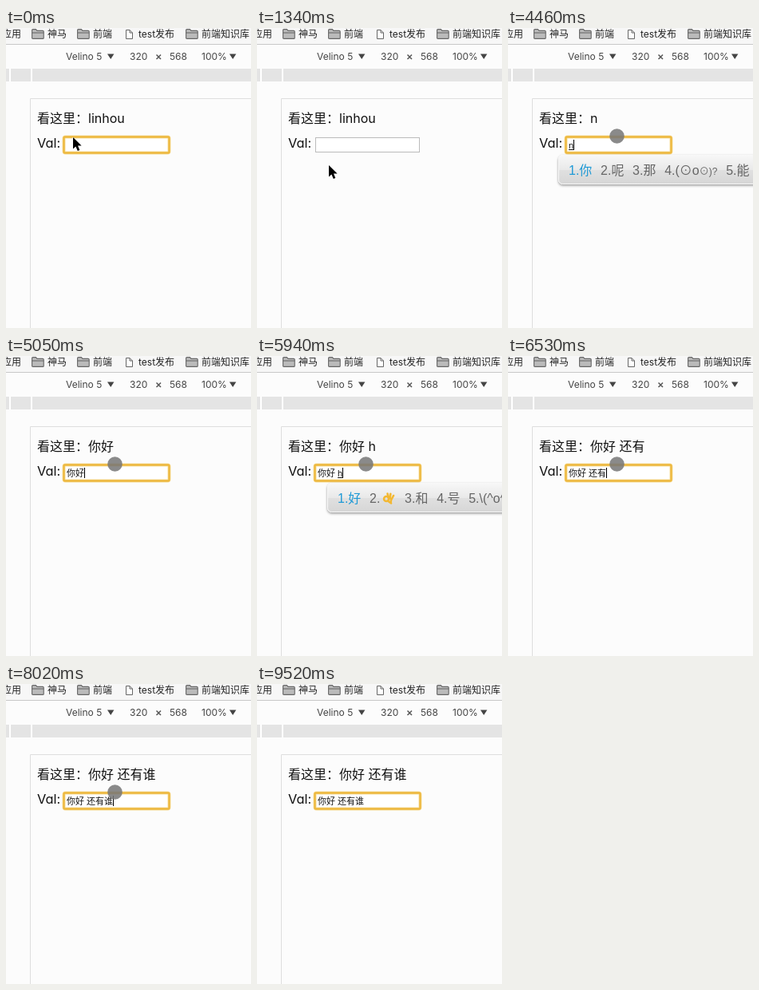
An HTML page that plays this animation: 307x376 px, repeating every 9680 ms.

```html
<!DOCTYPE html>
<html lang="zh">
<head>
<meta charset="utf-8">
<title>Input binding</title>
<style>
  html, body { margin: 0; width: 100%; height: 100%; overflow: hidden; background: #fcfcfc; }
  svg { display: block; }
  text { white-space: pre; }
  .bar { font: 12px Inter, "Noto Sans CJK SC", "Noto Sans CJK", sans-serif; fill: #222; }
  .tool { fill: #444; }
  .page { font: 16.4px Inter, sans-serif; font-feature-settings: "cv11"; fill: #111; }
  .han { font: 16px "Noto Sans CJK SC", "Noto Sans CJK", sans-serif; fill: #111; }
  .value { font: 11px "Liberation Sans", "Noto Sans CJK SC", "Noto Sans CJK", sans-serif; fill: #111; }
  .pick { font: 16px "Liberation Sans", "Noto Sans CJK SC", "Noto Sans CJK", "DejaVu Sans", sans-serif; fill: #666; }
  .pick.first { fill: #1f9ad6; }
</style>
</head>
<body>
<svg width="307" height="376" viewBox="0 0 307 376">
  <defs>
    <linearGradient id="panelFill" x2="0" y2="1">
      <stop stop-color="#f7f7f7"/><stop offset=".5" stop-color="#e9e9e9"/>
      <stop offset=".52" stop-color="#e0e0e0"/><stop offset="1" stop-color="#d6d6d6"/>
    </linearGradient>
    <filter id="shadow" x="-10%" y="-30%" width="120%" height="170%">
      <feDropShadow dx="0" dy="1.5" stdDeviation="1.7" flood-opacity=".4"/>
    </filter>
    <g id="folder" stroke="#666" stroke-width="1.1">
      <path d="M.6 11.4V1.8Q.6.6 1.8.6H5.4L7 2.4H14Q15.2 2.4 15.2 3.6V11.4Q15.2 12.4 14 12.4H1.8Q.6 12.4.6 11.4Z" fill="#bbb"/>
      <path d="M.6 5H15.2" />
    </g>
    <path id="down" d="M0 0H8.4L4.2 6.6Z" fill="#444"/>
    <g id="hand" fill="none" stroke="#f3b832" stroke-width="2.6" stroke-linecap="round">
      <circle cx="5" cy="8" r="3"/>
      <path d="M7.5 6L6.5 1.5M9.5 7.5L10.3 1.7M11 9.5L14 4M8 11.5L11 13.5M11 9L10.5 13"/>
    </g>
  </defs>

  <rect width="307" height="376" fill="#fcfcfc"/>
  <rect width="307" height="20" fill="#f7f7f7"/>
  <path d="M0 20.5H307" stroke="#c8c8c8"/>
  <g class="bar">
    <text x="-5" y="12">应用</text>
    <use href="#folder" x="32" y="1"/><text x="52" y="12">神马</text>
    <use href="#folder" x="89" y="1"/><text x="109" y="12">前端</text>
    <path d="M150.5 2.5H155L158.5 6V13.5H150.5ZM155 2.5V6H158.5" fill="#fff" stroke="#666"/>
    <text x="166" y="12">test发布</text>
    <use href="#folder" x="225" y="1"/><text x="245" y="12">前端知识库</text>
  </g>
  <g class="bar tool">
    <text class="tool" x="75" y="40">Velino 5</text><use href="#down" x="127" y="32.5"/>
    <text class="tool" x="155" y="40">320</text>
    <path d="M188.5 33.5L194 39M194 33.5L188.5 39" stroke="#555" stroke-width="1.5"/>
    <text class="tool" x="205" y="40">568</text>
    <text class="tool" x="245" y="40">100%</text><use href="#down" x="280" y="32.5"/>
  </g>
  <rect y="51" width="307" height="16" fill="#e4e4e4"/>
  <path d="M5 51V67M32 51V67" stroke="#fff" stroke-width="2"/>
  <path d="M30.5 376V88.5H307" fill="none" stroke="#dedede"/>

  <text class="han" x="39" y="119">看这里：</text>
  <text class="page han" id="echo" x="103" y="118.5" style="font-family:Inter,'Noto Sans CJK SC','Noto Sans CJK',sans-serif"></text>
  <text class="page" x="39" y="150">Val:</text>
  <rect x="73.5" y="137.5" width="130" height="18" fill="#fff" stroke="#bbb"/>
  <g id="ring" fill="none">
    <rect x="72.5" y="136.5" width="132" height="20" rx="2" stroke="#f8dfa0" stroke-width="4"/>
    <rect x="72.5" y="136.5" width="132" height="20" rx="1.5" stroke="#edb83f" stroke-width="2.4"/>
  </g>
  <text class="value" id="value" x="76" y="151"></text>
  <rect id="underline" y="152" height="1" fill="#111"/>
  <rect id="caret" y="140" width="1" height="13" fill="#000"/>
  <g id="panel">
    <rect x="-12.5" y="159.5" width="400" height="36" rx="5" fill="url(#panelFill)" stroke="#f8f8f8" filter="url(#shadow)"/>
    <g id="picks"></g>
  </g>
  <circle id="dot" cx="136.5" cy="135.5" r="9.3" fill="#777" fill-opacity=".86"/>
  <path id="arrow" d="M0 0V14.5L3.4 11.5L5.8 17L8.3 16L6 10.6H10.6Z" fill="#000" stroke="#fff" stroke-width="1" paint-order="stroke"/>
</svg>
<script>
const LOOP = 9680;
const el = id => document.getElementById(id);
const show = (id, on) => el(id).style.display = on ? '' : 'none';

// [time, committed text, text being composed]
const typing = [
  [0, '', ''], [3270, 'n', ''], [3570, '', ''],
  [4460, '', 'n'], [4610, '', 'ni'], [4750, '', 'ni h'], [4900, '', 'ni hao'], [5050, '你好', ''],
  [5790, '你好 ', ''], [5940, '你好 ', 'h'], [6090, '你好 ', 'ha'], [6240, '你好 ', 'hai'],
  [6390, '你好 ', 'hai you'], [6530, '你好 还有', ''],
  [6680, '你好 还有', 's'], [6830, '你好 还有', 'shei'], [6980, '你好 还有谁', '']
];
const candidates = {
  n: '你 呢 那 (⊙o⊙)? 能', ni: '你 呢 泥 尼 妮', 'ni h': '你好 你会 你还 你和', 'ni hao': '你好 拟好 你 呢',
  h: '好 👌 和 号 \\(^o^)/', ha: '哈 蛤 好 还 海', hai: '还 海 嗨 害 孩', 'hai you': '还有 海油 还 海',
  s: '是 谁 上 说 三', shei: '谁 水 说 睡 税'
};
// [time, x, y]; the pointer is hidden where x is missing
const pointer = [
  [0, 84, 137], [450, 85, 146], [600, 89, 165], [750, 93, 190], [890, 94, 203], [1040, 94, 203],
  [1190, 93, 192], [1340, 90, 172], [1490, 89, 157], [1630, 89, 149],
  [1930, 95, 146], [2080, 110, 141], [2230, 127, 135], [2380, 135, 133],
  [3570], [8770, 137, 160], [8920, 163, 232], [9070, 212, 360], [9220]
];
const focus = [[0, true], [1040, false], [2080, true]];
const caret = [
  [0, false], [2820, true], [4010, false], [4460, true], [5490, false], [5790, true],
  [7420, false], [8020, true], [8470, false], [9070, true], [9520, false]
];
const at = (track, t) => track.findLast(key => key[0] <= t);

function addPick(x, text, first) {
  const node = document.createElementNS('http://www.w3.org/2000/svg', 'text');
  node.setAttribute('class', first ? 'pick first' : 'pick');
  node.setAttribute('x', x);
  node.setAttribute('y', 184);
  node.textContent = text;
  el('picks').append(node);
  return node;
}

function fillPanel(composing) {
  el('picks').replaceChildren();
  let x = 0;
  candidates[composing].split(' ').forEach((word, i) => {
    const isHand = word === '👌';
    const node = addPick(x, `${i + 1}.${isHand ? '' : word}`, i === 0);
    if (word.endsWith(')?')) {
      node.innerHTML = `${i + 1}.(⊙o<tspan font-size="12">⊙)?</tspan>`;
      node.lastChild.style.fontSize = '12px';
    }
    if (isHand) {
      el('picks').insertAdjacentHTML('beforeend', `<use href="#hand" x="${x + 16}" y="171"/>`);
    }
    x += node.getComputedTextLength() + (isHand ? 30.7 : 10.7);
  });
}

let shown;
function showText(state) {
  if (state === shown) return;
  shown = state;
  const [time, done, composing] = state;
  const value = el('value');
  el('echo').textContent = time < 3270 ? 'linhou' : done + composing;
  value.textContent = done;
  const start = 76 + (done ? value.getComputedTextLength() : 0);
  value.textContent = done + composing;
  const end = 76 + (done + composing ? value.getComputedTextLength() : 0);
  el('caret').setAttribute('x', Math.round(end));
  el('underline').setAttribute('x', start);
  el('underline').setAttribute('width', end - start);
  show('panel', composing);
  if (composing) {
    el('panel').setAttribute('transform', `translate(${Math.round(start)})`);
    fillPanel(composing);
  }
}

function draw(now) {
  const t = now % LOOP;
  showText(at(typing, t));
  show('ring', at(focus, t)[1]);
  show('caret', at(caret, t)[1]);
  const [, x, y] = at(pointer, t);
  show('arrow', x !== undefined);
  if (x !== undefined) el('arrow').setAttribute('transform', `translate(${x} ${y})`);
  show('dot', t >= 3570 && t < 8770);
  requestAnimationFrame(draw);
}
requestAnimationFrame(draw);
</script>
</body>
</html>
```
